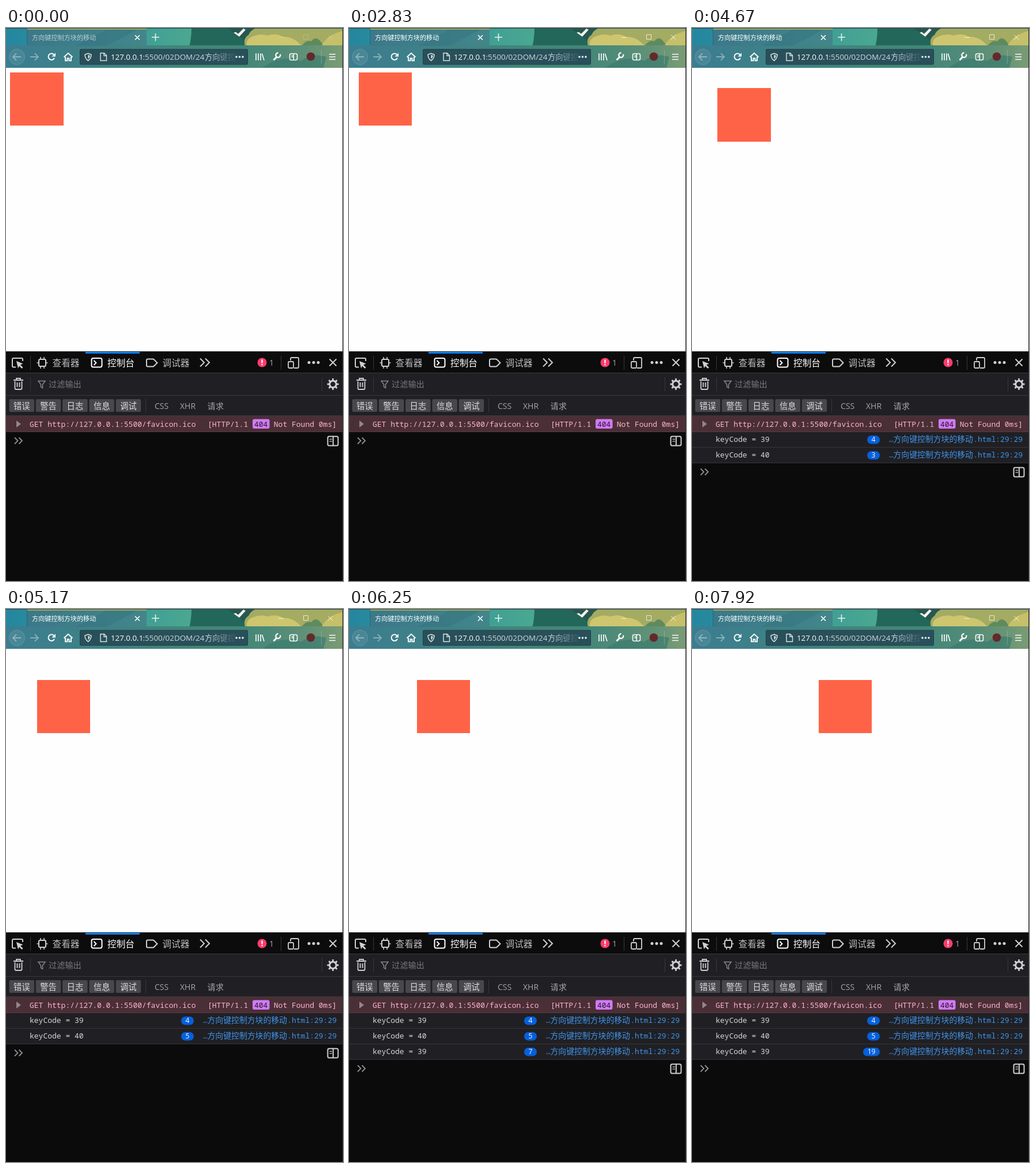
Write an HTML page with a canvas that moves like this. It is 585 by 958 pixels and loops after 8 s.

```html
<!DOCTYPE html>
<html lang="zh-CN">
<head>
<meta charset="utf-8">
<title>方向键控制方块的移动</title>
<style>
html, body { margin: 0; width: 100%; height: 100%; overflow: hidden; background: #0b0b0c; }
canvas { display: block; width: 585px; height: 958px; }
</style>
</head>
<body>
<canvas id="stage" width="585" height="958"></canvas>
<script>
const ctx = document.getElementById('stage').getContext('2d');
const LOOP = 8000;
const SANS = '"Open Sans", "Noto Sans CJK SC", "Noto Sans CJK", sans-serif';
const CJK = '"Noto Sans CJK SC", "Noto Sans CJK", sans-serif';
const MONO = '"Noto Sans Mono", "DejaVu Sans Mono", monospace';
const STEP = 9.23, SIDE = 92.3, ROW = 27;
const LIGHT = '#d0d0d2', LABEL = '#b9b9bc', DIM = '#a5a5a8', RULE = '#38383d';

// Key presses grouped the way the console groups repeated messages.
const series = (n, start, gap) => Array.from({ length: n }, (_, i) => start + i * gap);
const LAG = 80;
const groups = [
  { key: 39, times: [2830, 3250, 3500, 3750] },
  { key: 40, times: [4080, 4330, 4580, 4750, 4920] },
  { key: 39, times: [5170, 5310, 5450, 5580, ...series(7, 5750, 152), ...series(8, 7250, 60)] }
];

const passed = (times, t) => times.filter(at => at <= t).length;
const ramp = (t, start, len) => Math.min(1, Math.max(0, (t - start) / len));

function rect(x, y, w, h, fill) {
  ctx.fillStyle = fill;
  ctx.fillRect(x, y, w, h);
}
function pill(x, y, w, h, r, fill) {
  ctx.fillStyle = fill;
  ctx.beginPath();
  ctx.roundRect(x, y, w, h, r);
  ctx.fill();
}
function box(x, y, w, h, r, color, width = 2) {
  ctx.strokeStyle = color;
  ctx.lineWidth = width;
  ctx.beginPath();
  ctx.roundRect(x, y, w, h, r);
  ctx.stroke();
}
function disc(x, y, r, fill) {
  ctx.fillStyle = fill;
  ctx.beginPath();
  ctx.arc(x, y, r, 0, Math.PI * 2);
  ctx.fill();
}
function stroke(d, color, width = 2) {
  ctx.strokeStyle = color;
  ctx.lineWidth = width;
  ctx.stroke(new Path2D(d));
}
function shape(d, fill) {
  ctx.fillStyle = fill;
  ctx.fill(new Path2D(d));
}
function blend(x0, x1, from, to) {
  const g = ctx.createLinearGradient(x0, 0, x1, 0);
  g.addColorStop(0, from);
  g.addColorStop(1, to);
  return g;
}
function text(s, x, y, size, color, family = SANS, align = 'left') {
  ctx.font = `${size}px ${family}`;
  ctx.fillStyle = color;
  ctx.textAlign = align;
  ctx.fillText(s, x, y);
}
function dots(x, y, color, r = 1.8, gap = 5.5) {
  for (let i = -1; i <= 1; i++) disc(x + i * gap, y, r, color);
}
function cross(x, y, r, color, width) {
  stroke(`M${x - r} ${y - r}l${2 * r} ${2 * r}m0 ${-2 * r}l${-2 * r} ${2 * r}`, color, width);
}
function chevrons(x, y, r, color, width = 2) {
  const one = `l${r} ${r}l${-r} ${r}`;
  stroke(`M${x} ${y - r}${one}M${x + r + 2} ${y - r}${one}`, color, width);
}
function sidebarIcon(x, y, w, h, color, width) {
  box(x, y, w, h, 2.5, color, width);
  stroke(`M${x + w * .52} ${y}v${h}`, color, width);
  stroke(`M${x + 3} ${y + h * .3}h${w * .25}m0 ${h * .22}h${-w * .25}`, color, 1.3);
}
function gear(x, y) {
  for (let a = 0; a < Math.PI * 2; a += Math.PI / 4) {
    const c = Math.cos(a), s = Math.sin(a);
    stroke(`M${x + 5 * c} ${y + 5 * s}L${x + 10 * c} ${y + 10 * s}`, LIGHT, 2.8);
  }
  box(x - 5.8, y - 5.8, 11.6, 11.6, 5.8, LIGHT, 3);
}

function theme() {
  rect(0, 0, 585, 69, blend(0, 325, '#24869f', '#4aa891'));
  shape('M322 0H585V69H296Q322 46 322 0Z', '#22675a');
  shape('M384 0H440V31H424L404 14Z', '#27584f');
  // Mossy hill with lighter foliage behind the window buttons.
  shape('M415 31Q411 18 421 12Q424 4 434 0H585V31Z', '#a4ab62');
  shape('M418 31Q416 18 430 14Q442 9 454 13Q468 8 481 15Q500 15 513 31Z', '#cdc66f');
  shape('M513 31Q521 20 530 23Q540 10 551 31Z', '#5f8a5d');
  shape('M548 31Q556 12 585 5V31Z', '#c6c06a');
  shape('M395 8L399 7L403 10L412 1L416 3L405 15Z', '#f2f2ee');
  rect(0, 30, 585, 39, blend(0, 330, '#3b7d91', '#438678'));
  rect(420, 30, 165, 39, blend(420, 585, 'rgba(74,136,121,.5)', '#7b9c74'));
  shape('M445 69Q477 45 512 57Q533 42 556 50L551 69Z', 'rgba(56,122,111,.65)');
  rect(0, 0, 585, 1, '#26434a');
}

function tabStrip(active) {
  rect(37, 1, 207, 30, blend(37, 244, '#3c7889', '#42868b'));
  shape('M120 31L176 2H230L174 31Z', 'rgba(30,90,105,.18)');
  rect(37, 1, 207, 1.5, '#b9b75f');
  rect(36, 2, 1, 28, 'rgba(20,60,70,.4)');
  text('方向键控制方块的移动', 45, 20.5, 11.15, `rgba(255,255,255,${.62 + .38 * active})`, CJK);
  cross(228, 16.5, 4, '#fff', 1.7);
  stroke('M253 16h13M259.500 9.500v13', '#e8f3f0', 1.6);
  const edge = `rgba(255,255,255,${.2 + .55 * active})`;
  stroke('M473 16.500h9', edge, 1);
  box(516.5, 11.5, 8, 8, 0, edge, 1);
  cross(563, 16, 4.2, edge, 1);
}

function navBar() {
  const faint = 'rgba(255,255,255,.38)', white = '#f7f9f9', soft = '#dce4e5';
  disc(19, 50, 13.5, 'rgba(255,255,255,.07)');
  box(5.5, 36.5, 27, 27, 13.5, 'rgba(255,255,255,.16)', 1);
  stroke('M26 50H12M18 44l-6 6l6 6', faint, 1.8);
  stroke('M42 50h14M50 44l6 6l-6 6', faint, 1.8);
  stroke('M83.500 46.500A5.500 5.500 0 1 0 84 52', white, 2);
  shape('M86 43v6.500h-6.500z', white);
  stroke('M100.500 50.500L108 43.500L115.500 50.500M103 50v6.500h3.500v-4h3v4h3.500V50', white, 2);

  pill(128, 36.5, 292, 27, 2, '#29505a');
  box(128.5, 37, 291, 26, 2, 'rgba(20,48,54,.5)', 1);
  stroke('M142.500 44L148 46Q148 53 142.500 56.500Q137 53 137 46Z', soft, 1.5);
  shape('M142.500 46.500L145.800 47.700Q145.500 51.500 142.500 53.800Z', soft);
  stroke('M164 43.500h6.500l4 4v9h-10.500zM170 44v4h4', soft, 1.4);
  text('127.0.0.1', 182, 54.5, 13.3, '#fff');
  text(':5500/02DOM/24', 237.5, 54.5, 13.4, '#cdd8da');
  text('方向键控', 345, 54.5, 13.3, blend(352, 394, '#cdd8da', 'rgba(205,216,218,.12)'), CJK);
  dots(405.5, 50, '#eef3f3');

  stroke('M434 44v12M438 44v12M442 44v12M444.500 44.500l3.500 11.500', white, 1.7);
  stroke('M464.500 55.500l6-6', white, 3);
  stroke('M476 45.500A4 4 0 1 1 472.500 43', white, 2.4);
  sidebarIcon(492.5, 44.5, 13, 11, white, 1.6);
  disc(529, 49.5, 7.3, '#65292a');
  rect(547, 38, 1, 24, 'rgba(255,255,255,.22)');
  stroke('M561 45.500h11M561 50h11M561 54.500h11', white, 1.7);
}

function toolTabs() {
  rect(0, 560, 585, 37, '#0c0c0d');
  rect(0, 560, 585, 1, '#303035');
  rect(138, 561, 94, 3, '#0a84ff');
  rect(42, 568, 1, 24, RULE);
  stroke('M17 587.500H13Q11 587.500 11 585.500V574Q11 572 13 572H27Q29 572 29 574V577', LIGHT);
  shape('M18 577l11.500 4.500l-4.500 2l4.500 4.500l-2 2l-4.500-4.500l-2 4z', LIGHT);
  box(57, 574, 12, 12, 2, LIGHT);
  stroke('M60 570v4M66 570v4M60 586v4M66 586v4M53.500 580h3.500M69 580h3.500', LIGHT, 1.6);
  text('查看器', 80.5, 585.5, 15.7, LABEL, CJK);
  box(148.5, 572, 18, 15.5, 3, '#fff');
  stroke('M152.500 576l4 4l-4 4', '#fff', 1.9);
  text('控制台', 176, 585.5, 15.7, '#fff', CJK);
  stroke('M246 573.500h9q1 0 2 1l5.500 5.500l-5.500 5.500q-1 1-2 1h-9q-2 0-2-2v-9q0-2 2-2z', LIGHT);
  text('调试器', 271.5, 585.5, 15.7, LABEL, CJK);
  chevrons(337, 579.5, 7, LIGHT);
  disc(444.5, 579.5, 8, '#ff3b6b');
  rect(443.4, 574.5, 2.2, 6, '#fff');
  rect(443.4, 582, 2.2, 2.2, '#fff');
  text('1', 457, 585, 14, DIM);
  rect(477, 568, 1, 24, RULE);
  stroke('M494 576v-3q0-2 2-2h10q2 0 2 2v14q0 2-2 2h-6', LIGHT, 1.8);
  box(490, 578, 9, 11, 1.5, LIGHT, 1.8);
  dots(534, 579.5, LIGHT, 2.5, 8);
  cross(567.5, 579.5, 6, LIGHT, 2);
}

function filterBars() {
  rect(0, 597, 585, 75, '#202024');
  [597, 636, 671].forEach(y => rect(0, y, 585, 1, RULE));
  stroke('M13 610h17M18 609v-2h7v2M15.500 612v12q0 2 2 2h8q2 0 2-2v-12M19.500 614v8M23.500 614v8', LIGHT, 1.8);
  rect(42, 605, 1, 24, RULE);
  stroke('M56 611.500h12l-4.500 6v6l-3-2v-4z', '#85858a', 1.5);
  text('过滤输出', 74, 622, 14.2, '#77777c', CJK);
  rect(548, 605, 1, 24, RULE);
  gear(567.5, 617);

  ['错误', '警告', '日志', '信息', '调试'].forEach((label, i) => {
    const x = 5.5 + i * 46.3;
    pill(x, 643, 43.5, 22, 2, '#48484c');
    text(label, x + 21.8, 659.8, 14.3, '#dedee0', CJK, 'center');
  });
  rect(242, 642, 1, 24, RULE);
  text('CSS', 258, 660, 14, DIM);
  text('XHR', 302, 660, 14, DIM);
  text('请求', 349.5, 660, 14.2, DIM, CJK);
}

function errorRow() {
  rect(0, 672, 585, 27, '#4a2f37');
  rect(0, 699, 585, 1, '#5d3944');
  shape('M18 680l8 6l-8 6z', '#94868b');
  const pink = '#ffb5cc';
  text('GET http://127.0.0.1:5500/favicon.ico', 41, 690.5, 13, pink, MONO);
  text('[HTTP/1.1', 350, 690.5, 13, pink, MONO);
  pill(428, 677.5, 29.5, 16.5, 3, '#d07af5');
  text('404', 431, 690.5, 13, '#2a1730', MONO);
  text('Not Found 0ms]', 464.8, 690.5, 13, pink, MONO);
}

function logRow(i, key, count) {
  const top = 700 + i * ROW, base = top + 17.3, blue = '#3f93ea';
  rect(0, top, 585, ROW, '#202024');
  rect(0, top + ROW - 1, 585, 1, '#34343a');
  text(`keyCode = ${key}`, 41, base, 13, '#d7d7db', MONO);
  if (count > 1) {
    const w = count > 9 ? 29 : 22;
    pill(326 - w, top + 6, w, 14.5, 7.2, '#0560dc');
    text(count, 326 - w / 2, base, 12, '#fff', SANS, 'center');
  }
  text('…', 342, base, 13, blue, MONO);
  text('方向键控制方块的移动', 349.5, base, 13.85, blue, CJK);
  text('.html:29:29', 574, base, 13, blue, MONO, 'right');
}

function prompt(rows, t) {
  const y = 715 + rows * ROW;
  const focused = t >= 160 && t < 1080;
  chevrons(15, y, 5.5, focused ? '#75bfff' : '#8f8f93', 1.8);
  if (focused && t < 920) rect(41, 706, 1, 18, '#e4e4e6');
  sidebarIcon(558.5, y - 7.5, 18, 16, LIGHT, 2);
}

function square(right, down) {
  const x = 7.4 + STEP * right, y = 76.6 + STEP * down;
  const left = Math.round(x), top = Math.round(y);
  rect(left, top, Math.round(x + SIDE) - left, Math.round(y + SIDE) - top, '#ff6347');
}

function draw(t) {
  rect(0, 0, 585, 958, '#0b0b0c');
  theme();
  tabStrip(ramp(t, 80, 200) - ramp(t, 1420, 250) + ramp(t, 2670, 160));
  navBar();

  rect(0, 69, 584, 491, '#fefefe');
  const moves = groups.map(g => passed(g.times, t));
  square(moves[0] + moves[2], moves[1]);

  toolTabs();
  filterBars();
  errorRow();
  let rows = 0;
  for (const g of groups) {
    const count = passed(g.times, t - LAG);
    if (count) logRow(rows++, g.key, count);
  }
  prompt(rows, t);
  rect(584, 0, 1, 958, '#25282a');
}

const begin = performance.now();
function tick() {
  draw((performance.now() - begin) % LOOP);
  requestAnimationFrame(tick);
}
tick();
</script>
</body>
</html>
```
